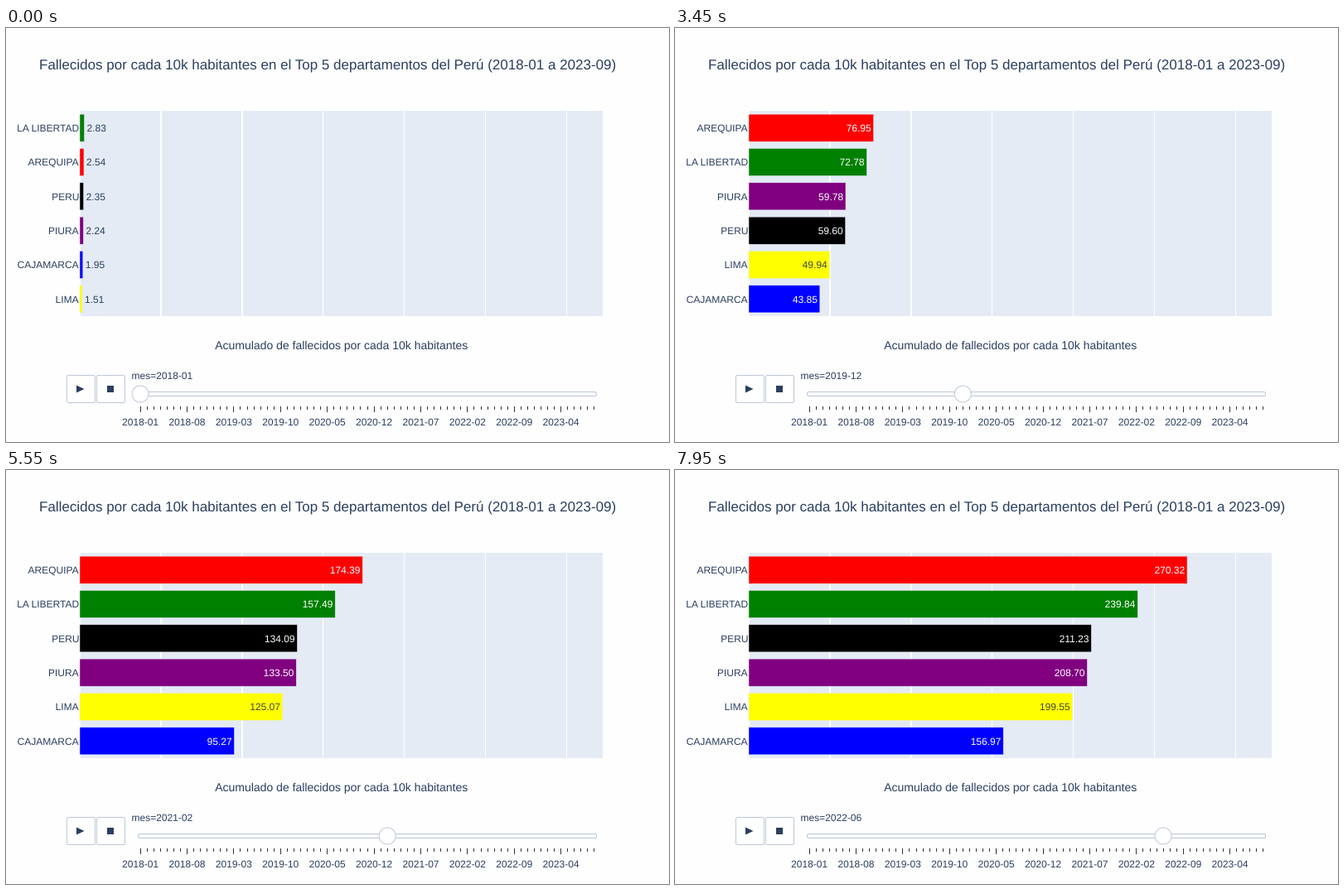
A matplotlib script for the animation above (8000 ms loop, 800 px wide and 500 px high).

```python
import numpy as np
import matplotlib.pyplot as plt
from matplotlib.animation import FuncAnimation
from matplotlib.patches import Circle, FancyBboxPatch, PathPatch, Polygon, Rectangle
from matplotlib.path import Path
from matplotlib.textpath import TextPath

plt.rcParams["font.family"] = "Liberation Sans"

W, H, DPI = 800, 500, 100
PX = 72 / DPI
INK, EDGE, PLOT_BG = "#2a3f5f", "#bec8d9", "#e4ebf5"
X0, SCALE = 89, 1.957                # bar origin, pixels per unit
TOP, PLOT_H = 100, 248
ROW = PLOT_H / 6
BAR_H = 0.8 * ROW
SLIDER_X, STEP, MONTHS = 162.1, 8.057, 69
FRAME_MS, FRAMES_PER_MONTH, FRAMES = 50, 3, 160

# Colour and cumulative value at each milestone month
MILESTONES = [0, 8, 16, 30, 46, 53]
REGIONS = {
    "LA LIBERTAD": ("green", [2.83, 26.93, 52.43, 118.81, 209.41, 239.84]),
    "AREQUIPA": ("red", [2.54, 27.04, 54.85, 126.91, 238.13, 270.32]),
    "PERU": ("black", [2.35, 22.75, 43.09, 96.92, 184.00, 211.23]),
    "PIURA": ("purple", [2.24, 21.51, 42.60, 98.64, 180.31, 208.70]),
    "CAJAMARCA": ("blue", [1.95, 17.33, 33.14, 68.08, 131.77, 156.97]),
    "LIMA": ("yellow", [1.51, 17.47, 33.47, 87.19, 175.93, 199.55]),
}
WAVES = [(29.5, 15), (39.5, 11), (49, 3)]   # peak month, excess in normal months


def pace(month):
    """Steady growth plus a logistic surge for every wave."""
    month = np.asarray(month, float)
    return month + sum(size / (1 + np.exp((peak - month) / 1.2)) for peak, size in WAVES)


def total(name, month):
    return np.interp(pace(month), pace(MILESTONES), REGIONS[name][1])


def month_name(m):
    return f"{2018 + m // 12}-{m % 12 + 1:02d}"


fig = plt.figure(figsize=(W / DPI, H / DPI), dpi=DPI, facecolor="#fefefe")
ax = fig.add_axes([0, 0, 1, 1])
ax.set_xlim(0, W)
ax.set_ylim(H, 0)
ax.axis("off")


def rect(x, y, w, h, color, **style):
    return ax.add_patch(Rectangle((x, y), w, h, fc=color, **{"lw": 0, **style}))


def rounded(x, y, w, h, color):
    ax.add_patch(FancyBboxPatch((x, y), w, h, boxstyle="round,pad=0,rounding_size=2",
                                fc=color, ec=EDGE, lw=PX))


def glyphs(x, y, s, size=12, anchor="left"):
    """Outline of a text line with its baseline at y, free of pixel rounding."""
    path = TextPath((0, 0), s, size=size)
    box = path.get_extents()
    shift = {"left": 0, "center": -(box.x0 + box.x1) / 2, "right": -box.x1 - 0.4}[anchor]
    return Path(path.vertices * [1, -1] + [x + shift, y], path.codes)


def text(*args):
    return ax.add_patch(PathPatch(glyphs(*args), fc=INK, lw=0, snap=False, zorder=3))


def draw_static():
    text(40, 50, "Fallecidos por cada 10k habitantes en el Top 5 departamentos "
                 "del Perú (2018-01 a 2023-09)", 17)
    text(404.5, 388, "Acumulado de fallecidos por cada 10k habitantes", 14, "center")
    rect(90, TOP, 630, PLOT_H, PLOT_BG)
    for k in range(1, 7):
        rect(88 + 98 * k, TOP, 2 if k < 3 else 1, PLOT_H, "white")

    for x in (73.5, 109.5):
        rounded(x, 419.5, 34, 33, "white")
    ax.add_patch(Polygon([(85, 431.5), (94.5, 436), (85, 440.5)], fc=INK, lw=0))
    rect(122, 432, 8, 8, INK)

    rounded(159.5, 439.5, 553, 5, "#f8fafc")
    for m in range(MONTHS):
        x = SLIDER_X + STEP * m
        major = m % 7 == 0
        rect(int(x), 457, 1, 7 if major else 4, "#333333")
        if major:
            text(x, 480, month_name(m), 12, "center")


draw_static()
bars = {name: rect(X0, 0, 1, BAR_H, color, ec="#e5ecf6", lw=0.5 * PX, snap=False)
        for name, (color, _) in REGIONS.items()}
labels = {name: text(0, 0, name) for name in REGIONS}
values = {name: text(0, 0, "0") for name in REGIONS}
handle = ax.add_patch(Circle((SLIDER_X, 442), 10, fc="white", ec=EDGE, lw=PX, zorder=2))
current = text(0, 0, "mes")


def update(frame):
    month = frame // FRAMES_PER_MONTH
    totals = {name: total(name, month) for name in REGIONS}
    for rank, name in enumerate(sorted(totals, key=totals.get, reverse=True)):
        center = TOP + ROW * (rank + 0.5)
        baseline = round(center + 4.3)
        width = totals[name] * SCALE
        bars[name].set_y(center - BAR_H / 2)
        bars[name].set_width(width)
        labels[name].set_path(glyphs(88, baseline, name, 12, "right"))

        inside = width >= 36
        offset, anchor = (-3, "right") if inside else (3, "left")
        values[name].set_path(glyphs(X0 + width + offset, baseline,
                                     f"{totals[name]:.2f}", 12, anchor))
        inner = "#444444" if name == "LIMA" else "white"
        values[name].set_facecolor(inner if inside else INK)
    handle.center = (SLIDER_X + STEP * month, 442)
    current.set_path(glyphs(151.5, 424, f"mes={month_name(month)}"))


anim = FuncAnimation(fig, update, frames=FRAMES, interval=FRAME_MS,
                     init_func=lambda: update(0), repeat=True, repeat_delay=0)
plt.show()
```
